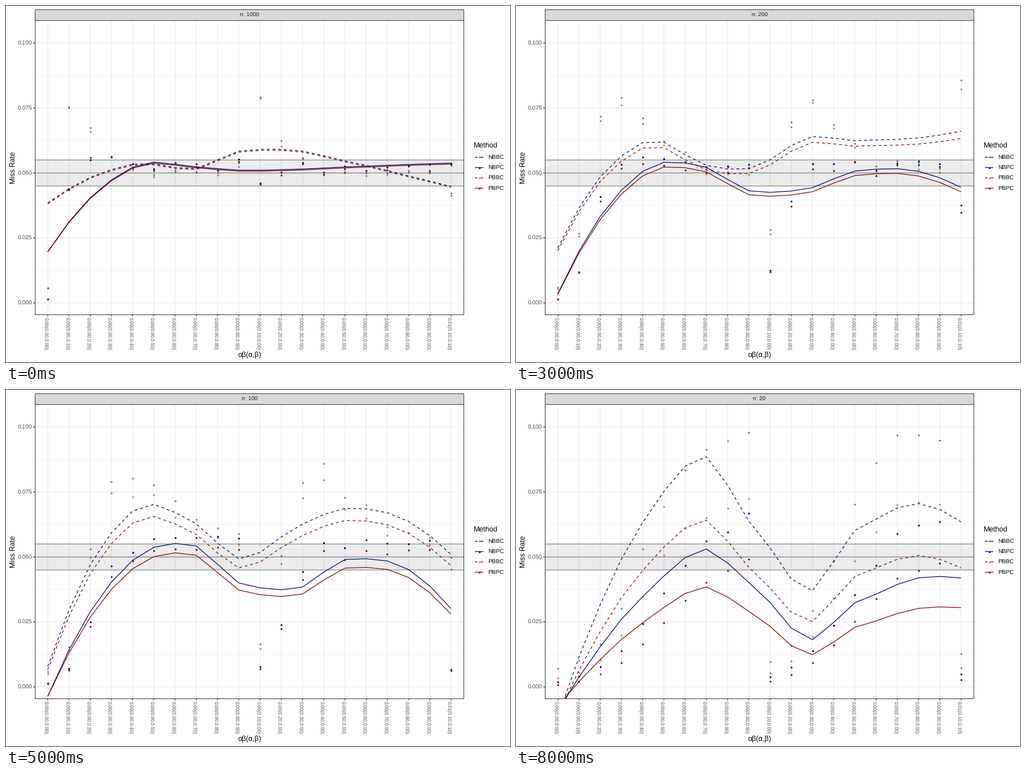
Recreate the animation shown at these times as a matplotlib script. Size 890 by 629 pixels, loop 9000 ms.

```python
import numpy as np
import matplotlib.pyplot as plt
from matplotlib.animation import FuncAnimation
from matplotlib.patches import Rectangle

W, H, DPI = 890, 629, 64
PT = 72 / DPI
LEFT, TOP, RIGHT, BOTTOM = 51.2, 25.2, 808.4, 545.2
STRIP_TOP = 6.2
BIG, SMALL, TINY = 12.8, 10.3, 8.55
LW = 1.25

plt.rcParams["font.family"] = "Liberation Sans"
plt.rcParams["text.hinting"] = "none"

STYLES = {
    "NBBC": ("#000080", True),
    "NBPC": ("#000080", False),
    "PBBC": ("#8b0000", True),
    "PBPC": ("#8b0000", False),
}
SIZES = [1000, 500, 250, 200, 150, 100, 75, 50, 20]

# Conditions: one path grows while the other is zero, then both are 0.1
tenths = np.arange(10) / 10
alpha = np.r_[0 * tenths, tenths[1:], 0.1]
beta = np.r_[tenths, 0 * tenths[1:], 0.1]
cond = np.arange(1, len(alpha) + 1)


def rise(s, mid, scale):
    return 1 / (1 + np.exp((mid - s) / scale))


def hump(s, peak, width):
    return np.exp(-(np.log(np.maximum(s, 0.01) / peak) / width) ** 2)


def miss_rate(n, method):
    """Expected miss rate from the signal strength of the nonzero path."""
    s = np.maximum(alpha, beta) * np.sqrt(n)
    if method.endswith("BC"):
        null = 0.0045 + 0.046 * rise(s, 1.6, 0.45) + 0.028 * hump(s, 3.6, 0.65)
        null = null * (1 + 5 / n)
        both = 0.013 + 0.029 * rise(s, 1, 0.12) + 0.046 * hump(s, 1.3, 0.35)
    else:
        null = 0.0525 * (1 + 6 / n) * rise(s, 2.15, 0.6)
        both = 0.005 + 0.0495 * rise(s, 1.352, 0.116)
    rate = np.where(alpha * beta > 0, both, null)
    if method.startswith("PB"):
        rate = rate * (1 + 7 / n) ** -(1 + 1.5 * np.exp(-s))
    return rate


def scatter(n):
    """Sampling noise, mostly shared by the methods."""
    rng = np.random.default_rng(n)
    shared = rng.normal(0, 0.03, len(cond))
    return {m: 1 + shared + rng.normal(0, 0.01, len(cond)) for m in STYLES}


# Loess smoother: local quadratics at k-d tree vertices, cubic blending between
SPAN_COUNT = 15
MARGIN = 0.005 * 19


def cuts(lo, hi):
    if hi - lo < 3:
        return []
    mid = (lo + hi) // 2
    return cuts(lo, mid) + [mid] + cuts(mid + 1, hi)


knots = np.array([1 - MARGIN] + cuts(1, 20) + [20 + MARGIN])


def local_fit(v, y):
    d = np.abs(cond - v)
    reach = np.sort(d)[SPAN_COUNT - 1]
    root_w = np.clip(1 - (d / reach) ** 3, 0, 1) ** 1.5
    _, slope, value = np.polyfit(cond - v, y, 2, w=root_w)
    return value, slope


def loess(y):
    val, slope = np.array([local_fit(v, y) for v in knots]).T
    k = np.searchsorted(knots, cond) - 1
    h = knots[k + 1] - knots[k]
    t = (cond - knots[k]) / h
    return ((1 + 2 * t) * (1 - t) ** 2 * val[k]
            + t * (1 - t) ** 2 * h * slope[k]
            + t * t * (3 - 2 * t) * val[k + 1]
            + t * t * (t - 1) * h * slope[k + 1])


def px(i):
    return LEFT + (i - 0.4) * (RIGHT - LEFT) / 20.2


def py(v):
    return 524.6 - 4592 * v


fig = plt.figure(figsize=(W / DPI, H / DPI), dpi=DPI, facecolor="white")
ax = fig.add_axes([0, 0, 1, 1])
ax.set_xlim(0, W)
ax.set_ylim(H, 0)
ax.axis("off")


def line(xs, ys, color, width=LW, z=1, **kw):
    return ax.plot(xs, ys, color=color, lw=width * PT, zorder=z, snap=False,
                   solid_capstyle="butt", dash_capstyle="butt", **kw)[0]


def rect(top, bottom, z, face="none", edge="none", **kw):
    box = Rectangle((LEFT, top), RIGHT - LEFT, bottom - top, fc=face, ec=edge,
                    lw=PT, zorder=z, snap=True, **kw)
    return ax.add_patch(box)


def label(x, y, s, size, color="black", ha="center", **kw):
    return ax.text(x, y + 0.35 * size, s, fontsize=size * PT, color=color,
                   ha=ha, va="baseline", **kw)


def curve(xs, ys, method, z=4):
    color, dashed = STYLES[method]
    return line(xs, ys, color, z=z, ls=(0, (4, 4)) if dashed else "-")


def dots(xs, ys, method, z=5):
    color, light = STYLES[method]
    return ax.plot(xs, ys, "o", ms=3.3 * PT, mew=0, color=color,
                   alpha=0.5 if light else 1, zorder=z)[0]


# Grid and axes
for v in (0.0125, 0.0375, 0.0625, 0.0875):
    line([LEFT, RIGHT], [py(v)] * 2, "#ebebeb", LW / 2)
for v in (0, 0.025, 0.05, 0.075, 0.1):
    line([LEFT, RIGHT], [py(v)] * 2, "#ebebeb")
    line([LEFT - 3.2, LEFT], [py(v)] * 2, "#333333")
    label(45.8, py(v), f"{v:.3f}", SMALL, "#4d4d4d", "right")

for i, a, b in zip(cond, alpha, beta):
    line([px(i)] * 2, [TOP, BOTTOM], "#ebebeb")
    line([px(i)] * 2, [BOTTOM, BOTTOM + 3.2], "#333333")
    ax.text(px(i) + 0.4, 550, f"{a * b:.2f}({a:.2f},{b:.2f})",
            fontsize=TINY * PT, color="#4d4d4d", rotation=270,
            ha="right", va="top")

# Tolerance band
rect(py(0.055), py(0.045), 2, face="black", alpha=0.08)
for v in (0.045, 0.05, 0.055):
    line([LEFT, RIGHT], [py(v)] * 2, "#7f7f7f", 1.2, z=3)

# Frame, strip and titles
rect(TOP, BOTTOM, 6, edge="#333333")
rect(STRIP_TOP, TOP, 6, face="#d9d9d9", edge="#333333")
strip = label((LEFT + RIGHT) / 2, 15.8, "", SMALL, "#1a1a1a", zorder=7)
label((LEFT + RIGHT) / 2, 616, "αβ(α,β)", BIG)
ax.text(15.8, (TOP + BOTTOM) / 2, "Miss Rate", fontsize=BIG * PT, rotation=90,
        rotation_mode="anchor", ha="center", va="baseline")

# Legend
label(826, 245.5, "Method", BIG, ha="left")
for k, m in enumerate(STYLES):
    y = 267.3 + 18.2 * k
    curve([828, 843], [y, y], m)
    dots([835.6], [y], m)
    label(850.7, y, m, SMALL, ha="left")

# Moving series
clip = Rectangle((LEFT, TOP), RIGHT - LEFT, BOTTOM - TOP,
                 transform=ax.transData)
curves = {m: curve([], [], m) for m in STYLES}
points = {m: dots([], [], m) for m in STYLES}
for c in curves.values():
    c.set_clip_path(clip)


def update(i):
    n = SIZES[i]
    strip.set_text(f"n: {n}")
    noise = scatter(n)
    for m in STYLES:
        rate = miss_rate(n, m)
        curves[m].set_data(px(cond), py(loess(rate)))
        points[m].set_data(px(cond), py(rate * noise[m]))
    return [strip, *curves.values(), *points.values()]


anim = FuncAnimation(fig, update, frames=len(SIZES), interval=1000,
                     repeat=True, repeat_delay=0, blit=False)
plt.show()
```
